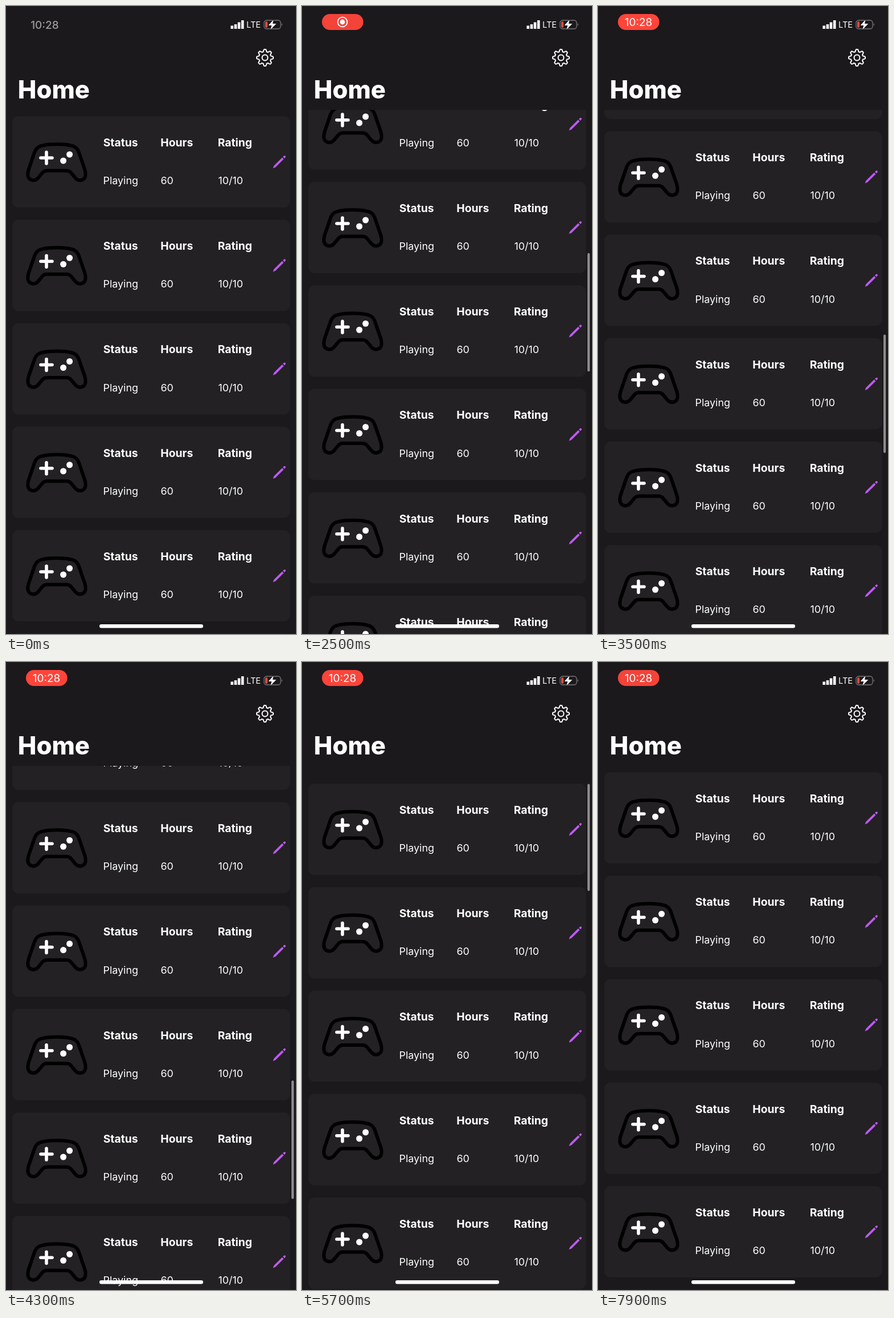
Animation of 509x1100 px, one loop 8 s. Source, as an HTML page:

```html
<!DOCTYPE html>
<html lang="en">
<head>
<meta charset="utf-8">
<title>Home</title>
<style>
html, body { margin: 0; width: 100%; height: 100%; overflow: hidden; background: #1b191c; }
svg { display: block; width: 100%; height: 100%; font-family: Inter, "Open Sans", sans-serif; fill: #fff; }
.head { font-size: 19.3px; font-weight: 700; }
.cell { font-size: 17.9px; }
.clock { font-size: 19px; text-anchor: middle; }
</style>
</head>
<body>
<svg viewBox="0 0 509 1100">
  <defs>
    <clipPath id="view"><rect y="182" width="509" height="918"/></clipPath>
    <g id="card">
      <rect x="11" y="193" width="487.5" height="160" rx="11" fill="#232124"/>
      <path fill="none" stroke="#000" stroke-width="6" stroke-linejoin="round" d="M57 247Q62 244 76 242.6Q89 241.6 102 242.6Q116 244 121 247Q126 250 128.500 258L138.500 287Q142.500 303 132 305Q126 306 122 301.500L114 292Q111 288.500 106 288.500H72Q67 288.500 64 292L56 301.500Q52 306 46 305Q35.500 303 39.500 287L49.500 258Q52 250 57 247Z"/>
      <path stroke="#fff" stroke-width="5.600" stroke-linecap="round" d="M61 266H81M71 256V276"/>
      <circle cx="111.600" cy="260" r="5.500"/>
      <circle cx="100.600" cy="271" r="5.500"/>
      <g class="head">
        <text x="170.700" y="245.800">Status</text>
        <text x="271.300" y="245.800">Hours</text>
        <text x="371.700" y="245.800">Rating</text>
      </g>
      <g class="cell">
        <text x="170.500" y="312.200">Playing</text>
        <text x="271.500" y="312.200">60</text>
        <text x="372.500" y="312.200">10/10</text>
      </g>
      <path fill="#bf5af2" d="M468.500 284.300L470.300 279.800L484.700 265.500L487.400 268.200L473 282.500ZM486 264.300L487.800 262.500Q489 261.300 490.300 262.500Q491.600 263.900 490.400 265.200L488.700 266.900Z"/>
    </g>
  </defs>

  <rect width="509" height="1100" fill="#1b191c"/>
  <g clip-path="url(#view)"><g id="list"></g></g>
  <rect id="bar" x="501" width="4.200" rx="2.100" fill="#8d8c8e"/>

  <text x="20.800" y="162" font-size="43.600" font-weight="800">Home</text>
  <g fill="none" stroke="#fff" stroke-width="2" stroke-linejoin="round">
    <path id="gear"/>
    <circle cx="454.500" cy="90.500" r="5"/>
  </g>

  <text id="plain" class="clock" x="68" y="39.500" font-weight="500">10:28</text>
  <g id="pill">
    <rect id="fill" x="35" y="14" width="72.600" height="28" rx="14"/>
    <g id="record">
      <circle cx="71" cy="28" r="8.400" fill="none" stroke="#fff" stroke-width="1.900"/>
      <circle cx="71" cy="28" r="4.400"/>
    </g>
    <text id="time" class="clock" x="71" y="34.800">10:28</text>
  </g>

  <path stroke="#fff" stroke-width="4.600" d="M396.700 40V34.500M402.900 40V32M409 40V28.500M415.200 40V25"/>
  <text x="422" y="38.300" font-size="14.700">LTE</text>
  <rect x="453" y="25" width="29" height="15" rx="4.500" fill="none" stroke="#79777a" stroke-width="1.300"/>
  <path fill="#79777a" d="M483.700 30Q486.300 32.500 483.700 35Z"/>
  <rect x="455" y="27" width="4" height="11" rx="1.800" fill="#ff453a"/>
  <path stroke="#1b191c" stroke-width="1.500" paint-order="stroke" d="M469.500 24L460.500 34H466.300L464.300 41.500L474.300 31H468Z"/>
  <rect x="164" y="1083" width="182" height="6.600" rx="3.300"/>
</svg>
<script>
const LOOP = 8000, STEP = 100, PITCH = 181.25, CARDS = 20;
const el = id => document.getElementById(id);
const set = (id, key, value) => el(id).setAttribute(key, value);
const clamp = (x, lo = 0, hi = 1) => Math.min(hi, Math.max(lo, x));
const ramp = (t, from, to) => clamp((t - from) / (to - from));

// Scroll positions: [ms, px]
const path = [
  [1350, 0], [1500, 17], [1700, 161.5], [1800, 300], [1950, 490], [2200, 705],
  [2300, 713], [2400, 812], [2500, 972.5], [2700, 1230], [3000, 1450],
  [3300, 1536], [3400, 1561], [3500, 1605], [3600, 1720], [3800, 1960],
  [4000, 2158], [4100, 2230], [4200, 2275], [4300, 2304], [4550, 2340],
  [4700, 2200], [5000, 1400], [5250, 500], [5400, 60], [5500, -45],
  [5600, -39], [5700, -20], [5850, -6], [6100, 0]
];

// Slope at a point, flat at ends and turning points
function slope(i) {
  const a = path[i - 1], b = path[i], c = path[i + 1];
  if (!a || !c) return 0;
  const before = (b[1] - a[1]) / (b[0] - a[0]), after = (c[1] - b[1]) / (c[0] - b[0]);
  return before * after > 0 ? 2 * before * after / (before + after) : 0;
}

function scrollAt(t) {
  const i = path.findIndex(p => p[0] > t);
  if (i < 1) return 0;
  const [t0, y0] = path[i - 1], [t1, y1] = path[i];
  const d = t1 - t0, u = (t - t0) / d, v = 1 - u;
  return y0 * v * v * (1 + 2 * u) + y1 * u * u * (3 - 2 * u)
    + d * u * v * (slope(i - 1) * v - slope(i) * u);
}

for (let i = 0; i < CARDS; i++)
  el("list").insertAdjacentHTML("beforeend", `<use href="#card" y="${i * PITCH}"/>`);

let outline = "";
for (let i = 0; i < 192; i++) {
  const a = i / 192 * 2 * Math.PI;
  const r = 12.6 + 1.9 * clamp(1.5 * Math.cos(8 * a), -1, 1);
  outline += `${i ? "L" : "M"}${(454.5 + r * Math.sin(a)).toFixed(2)} ${(90.5 - r * Math.cos(a)).toFixed(2)}`;
}
set("gear", "d", outline + "Z");

function draw(t) {
  const y = scrollAt(t);
  set("list", "transform", `translate(0 ${-y})`);
  set("bar", "y", 213.5 + Math.max(0, y) * 0.2255);
  set("bar", "height", 207.5 + Math.min(0, y));
  set("bar", "opacity", ramp(t, 1300, 1600) * (1 - ramp(t, 7000, 7300)));

  set("plain", "opacity", 0.56 * (1 - ramp(t, 0, 200)));
  set("pill", "opacity", ramp(t, 0, 400));
  const phase = (t + 800) % 2400 - 1200;
  const dim = Math.exp(-((phase / 350) ** 2));
  set("fill", "fill", `rgb(${255 - 22 * dim},${69 - 4 * dim},${58 - 2 * dim})`);
  const swap = ramp(t, 2800, 3100);
  set("record", "opacity", ramp(t, 100, 500) * (1 - swap));
  set("time", "opacity", swap);
}

function tick() {
  draw(Math.floor(performance.now() % LOOP / STEP) * STEP);
  requestAnimationFrame(tick);
}
tick();
</script>
</body>
</html>
```
